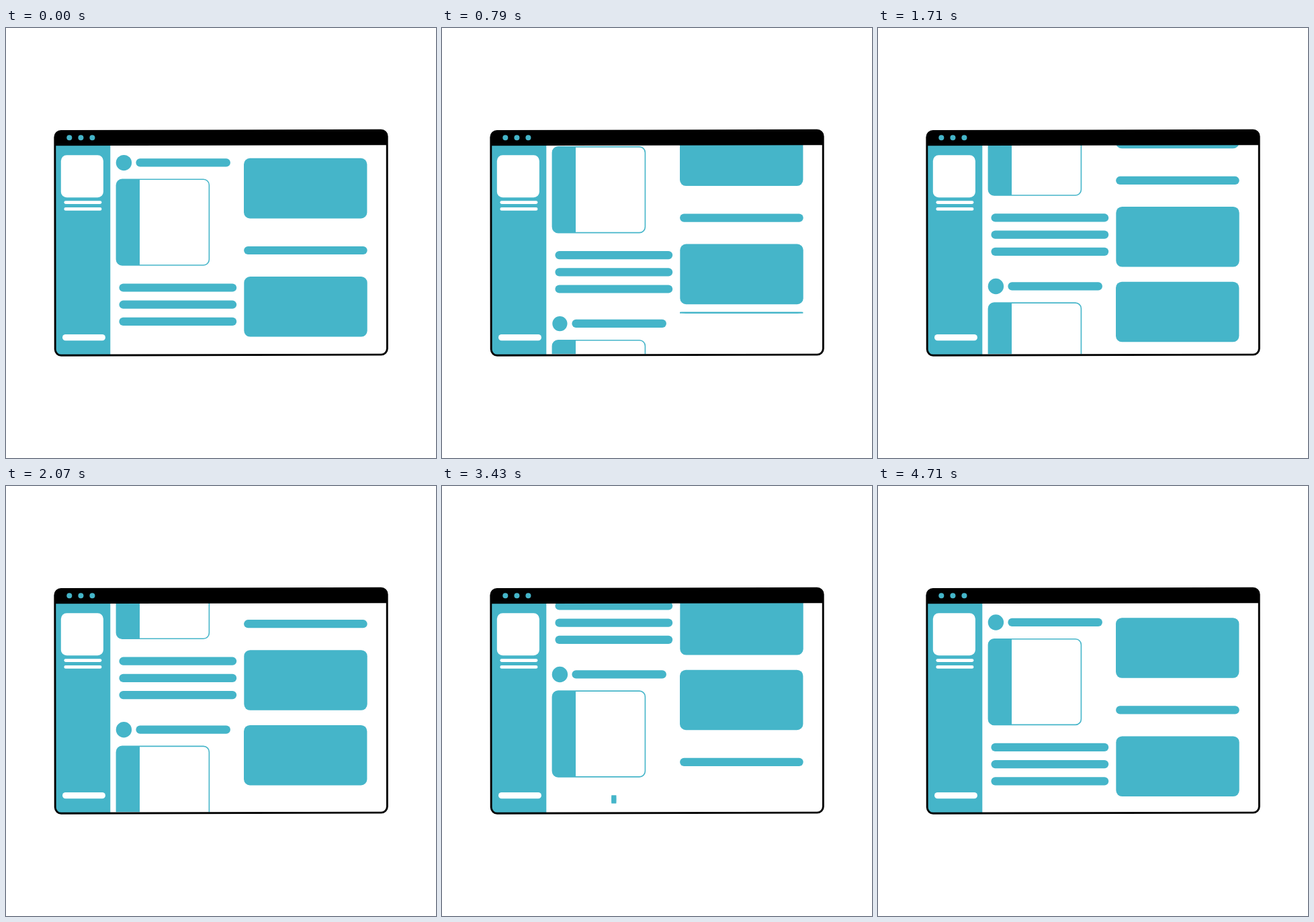
Recreate the animation shown at these times as an HTML page with a canvas. Size 640x640 px, loop 4.78 s.

```html
<!DOCTYPE html>
<html lang="en">
<head>
<meta charset="utf-8">
<title>Scrolling page</title>
<style>
html, body { margin: 0; width: 100%; height: 100%; overflow: hidden; background: #fff; }
canvas { display: block; width: 640px; height: 640px; }
</style>
</head>
<body>
<canvas id="stage" width="640" height="640"></canvas>
<script>
const ctx = document.getElementById('stage').getContext('2d');
const TEAL = '#45b5c9', LOOP = 4780, SHOWN_FPS = 14, SCENE_FPS = 25;
const PAGE = 287.9, SPEED = PAGE / 119;

const ease = (t, start, length) => {
  const u = Math.min(1, Math.max(0, (t - start) / length));
  return u * u * (3 - 2 * u);
};

function slab(x0, y0, x1, y1, r, color = TEAL) {
  ctx.fillStyle = color;
  ctx.beginPath();
  ctx.roundRect(x0, y0, x1 - x0, y1 - y0, r);
  ctx.fill();
}

function disc(x, y, r) {
  ctx.fillStyle = TEAL;
  ctx.beginPath();
  ctx.arc(x, y, r, 0, Math.PI * 2);
  ctx.fill();
}

function scaled(x, y, sx, sy, draw) {
  if (sx <= 0 || sy <= 0) return;
  ctx.save();
  ctx.translate(x, y);
  ctx.scale(sx, sy);
  ctx.translate(-x, -y);
  draw();
  ctx.restore();
}

// Each part grows in at its own moment; t = Infinity gives the finished page.
function page(y, t) {
  ctx.save();
  ctx.translate(0, y);

  const pop = 1.23 * ease(t, 2, 8) - 0.28 * ease(t, 10, 10) + 0.05 * ease(t, 20, 6);
  scaled(175.4, 200.6, pop, pop, () => disc(175.4, 200.6, 11.7));
  scaled(193.5, 200.4, ease(t, 4, 15), 1, () => slab(193.4, 194.3, 333.9, 206.6, 6));

  ctx.save();
  ctx.beginPath();
  ctx.roundRect(164.4, 225.3, 138, 127.7, 8.5);
  ctx.strokeStyle = TEAL;
  ctx.lineWidth = 1.6;
  ctx.stroke();
  ctx.clip();
  ctx.fillStyle = TEAL;
  ctx.fillRect(163, 224, 36, 130);
  ctx.restore();

  [380.4, 405.6, 430.8].forEach((top, i) =>
    scaled(255.8, top, ease(t, 84 + 8 * i, 16), 1, () => slab(168.4, top, 343.2, top + 12.2, 6.1)));

  scaled(0, 182.6, 1, ease(t, 18, 20), () => slab(354, 193.8, 537.4, 283.4, 9));
  scaled(445.9, 331, ease(t, 55, 15), 1, () => slab(354.1, 324.9, 537.7, 337.1, 6.1));
  scaled(0, 358.8, 1, ease(t, 94, 20), () => slab(354.3, 370, 537.7, 459.6, 9));
  ctx.restore();
}

function windowPath() {
  ctx.beginPath();
  ctx.moveTo(320, 152.9);
  ctx.arcTo(567.2, 152.2, 567.2, 320, 9);
  ctx.arcTo(567.4, 486.1, 320, 486.6, 9);
  ctx.arcTo(73.2, 487.3, 73, 320, 9);
  ctx.arcTo(72.8, 153.5, 320, 152.9, 9);
  ctx.closePath();
}

function browser() {
  ctx.save();
  windowPath();
  ctx.clip();
  ctx.fillStyle = TEAL;
  ctx.fillRect(70, 174, 85.3, 316);
  ctx.fillStyle = '#000';
  ctx.beginPath();
  ctx.moveTo(70, 150);
  ctx.lineTo(570, 150);
  ctx.lineTo(570, 174.2);
  ctx.lineTo(70, 175.3);
  ctx.fill();
  ctx.restore();

  windowPath();
  ctx.strokeStyle = '#000';
  ctx.lineWidth = 2.9;
  ctx.stroke();

  [94.3, 111.4, 128.4].forEach(x => disc(x, 163.2, 4));
  slab(81.8, 189.2, 144.9, 252.2, 8.5, '#fff');
  slab(86.4, 257.2, 142.4, 261.9, 2.3, '#fff');
  slab(86.4, 267, 142.4, 271.7, 2.3, '#fff');
  slab(84, 456, 147.9, 465.3, 4.6, '#fff');
}

function render(ms) {
  const shown = Math.floor((ms % LOOP + 5) * SHOWN_FPS / 1000 + 1e-6);
  const t = Math.ceil(shown * SCENE_FPS / SHOWN_FPS - 1e-6);
  const scroll = t * SPEED;

  ctx.fillStyle = '#fff';
  ctx.fillRect(0, 0, 640, 640);
  ctx.save();
  ctx.beginPath();
  ctx.rect(156, 174, 409, 311.3);
  ctx.clip();
  page(-scroll, Infinity);
  page(PAGE - scroll, t);
  ctx.restore();
  browser();
}

const began = performance.now();
function tick() {
  render(performance.now() - began);
  requestAnimationFrame(tick);
}
tick();
</script>
</body>
</html>
```
